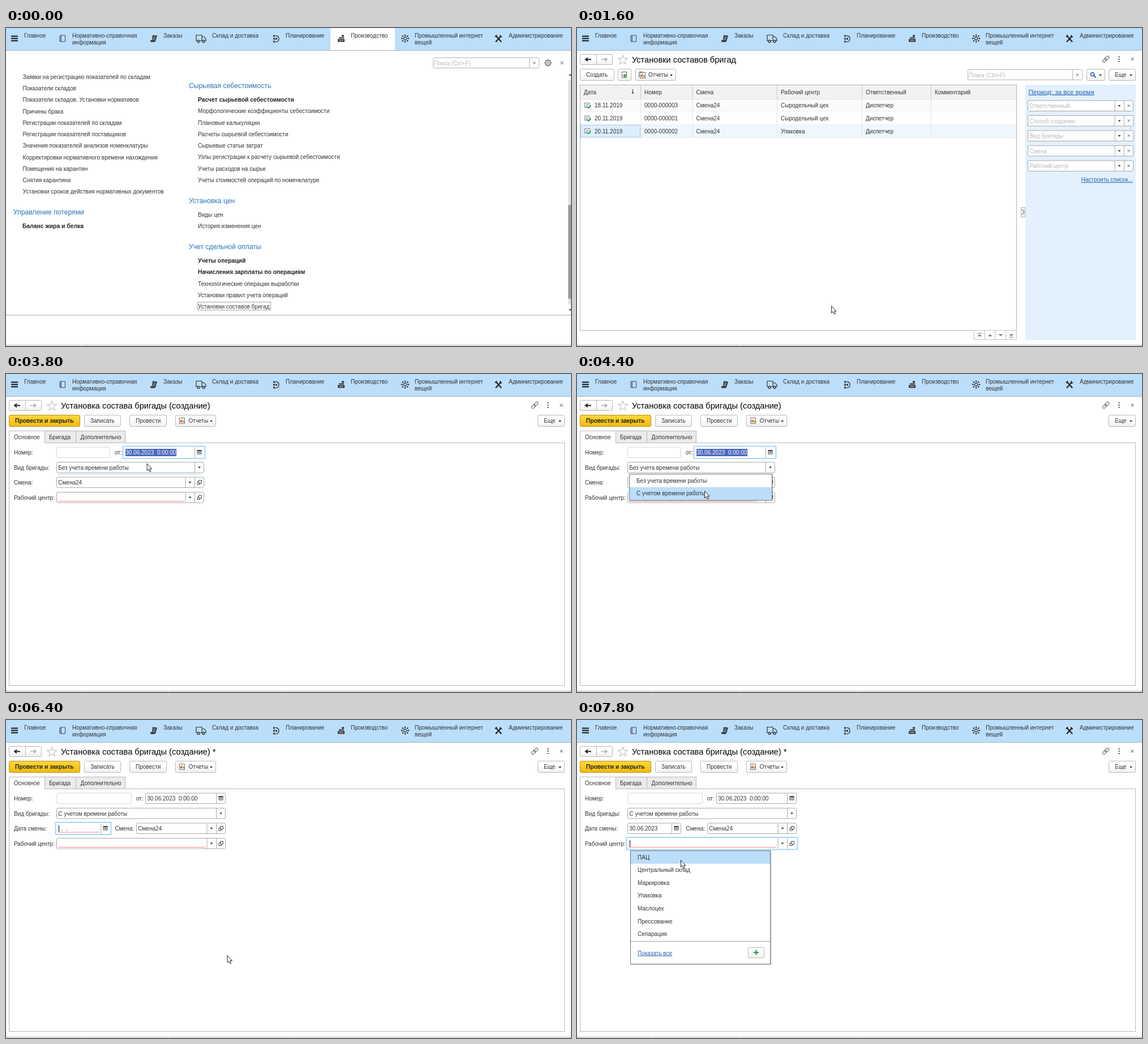
An HTML page that plays this animation: 998 px wide and 561 px high, repeating every 8 s.

```html
<!DOCTYPE html>
<html lang="ru">
<head>
<meta charset="utf-8">
<style>
html, body { margin: 0; width: 100%; height: 100%; overflow: hidden; background: #fff; }
svg { display: block; width: 998px; height: 561px; }
text { font: 10.03px "Liberation Sans", Arial, sans-serif; fill: #333; white-space: pre; }
.b { font-weight: bold; font-size: 10.35px; fill: #222; }
.h { font-size: 12.2px; fill: #2a73b8; }
.t { font-size: 14.6px; fill: #000; }
.p { fill: #b9b9b9; }
.w { fill: #fff; }
.a { fill: #2467ae; text-decoration: underline; }
.big { font-size: 11.5px; }
</style>
</head>
<body>
<svg id="stage" viewBox="0 0 998 561"></svg>
<script>
const LOOP = 8000, STEP = 200;
const stage = document.getElementById('stage');

// Basic shapes; text is placed by the middle of its capitals.
const text = (x, y, s, cls = '') => {
  const drop = cls == 't' ? 5.2 : cls == 'h' ? 4.2 : 3.6;
  return `<text x="${x}" y="${y + drop}" class="${cls}">${s}</text>`;
};
const rect = (x, y, w, h, fill = '#fff', stroke = 'none', r = 0, sw = 1) =>
  `<rect x="${x}" y="${y}" width="${w}" height="${h}" rx="${r}" fill="${fill}" stroke="${stroke}" stroke-width="${sw}"/>`;
const path = (d, stroke = '#333', fill = 'none', sw = 1) =>
  `<path d="${d}" stroke="${stroke}" fill="${fill}" stroke-width="${sw}"/>`;
const at = (x, y, s) => `<g transform="translate(${x} ${y})">${s}</g>`;
const solid = (d, c = '#333') => path(d, 'none', c);
const caretDown = (x, y) => solid(`M${x - 2.5} ${y - 1}h5l-2.5 3z`);
const cross = (x, y, r = 2, c = '#555') => path(`M${x - r} ${y - r}l${2 * r} ${2 * r}m0 ${-2 * r}l${-2 * r} ${2 * r}`, c);

const defs = `<defs>
<linearGradient id="grey" x2="0" y2="1"><stop offset=".4" stop-color="#fff"/><stop offset="1" stop-color="#f0f0f0"/></linearGradient>
<linearGradient id="gold" x2="0" y2="1"><stop stop-color="#ffd83a"/><stop offset="1" stop-color="#f2b90c"/></linearGradient></defs>`;

const icons = {
  book: path('M-3.5-5.5h9v11h-9zM-1.5-5.5v11M-5-3h2M-5 0h2M-5 3h2', '#445'),
  orders: solid('M-2-6L6-5 3 5Q2 7-6 6L-6 3-3 3z') + path('M-.5-3l4 .5M-1.2-.5l4 .5M-2 2l4 .5', '#bbdefb'),
  truck: path('M-8-6H2V4H-8zM2-3H6L9 1V4H2', '#333', 'none', 1.2) +
    '<g fill="#bbdefb" stroke="#333" stroke-width="1.3"><circle cx="-4" cy="5" r="2"/><circle cx="5" cy="5" r="2"/></g>',
  plan: solid('M-4-6h3v3h-3zM-4-1h3v3h-3zM-4 4h3v3h-3zM0-1h3v3h-3z') + path('M0-5Q6-5 6 .5T0 6', '#333', 'none', 1.3),
  factory: solid('M-6 1H6V6H-6zM-4-2H5V0H-4zM1-6H5V-3H1z') + path('M-4 3.5H4', '#ddd'),
  net: path('M0-6V6M-6 0H6M-5-5L5 5M5-5L-5 5') +
    [...Array(8)].map((_, i) => `<circle cx="${(6 * Math.cos(i * Math.PI / 4)).toFixed(1)}" cy="${(6 * Math.sin(i * Math.PI / 4)).toFixed(1)}" r="1.2" fill="#333"/>`).join('') +
    '<circle r="2.3" fill="#bbdefb" stroke="#333"/>',
  tools: path('M-4-4L5 6M4-4L-5 6', '#222', 'none', 2.3) + path('M-6-3l3-3M3-6l0 3 3 0', '#222', 'none', 2),
};
const sections = [
  [32, 0, '', 'Главное'], [117, 99, 'book', 'Нормативно-справочная', 'информация'],
  [278, 261, 'orders', 'Заказы'], [364, 344, 'truck', 'Склад и доставка'],
  [494, 476, 'plan', 'Планирование'], [609, 592, 'factory', 'Производство'],
  [722, 705, 'net', 'Промышленный интернет', 'вещей'], [888, 870, 'tools', 'Администрирование'],
];

function header(active) {
  return rect(0, 0, 998, 39, '#bbdefb') + path('M0 39.5H998', '#9db4c8') +
    (active ? rect(573, 0, 114, 39) : '') +
    path('M9 14.5H21M9 18.5H21M9 22.5H21', '#111', 'none', 2) +
    sections.map(([x, ix, icon, a, b]) =>
      (icon ? at(ix, 18.5, icons[icon]) : '') + text(x, 13, a) + (b ? text(x, 25.5, b) : '')).join('');
}

function statusBar(...ticks) {
  return path('M0 559.5H998', '#a9a9a9') + ticks.map(x => rect(x, 559, 2, 2, '#e8e8e8')).join('');
}

function button(x, y, w, label, { lx = x + 10, cls = '', fill = 'url(#grey)', edge = '#b8b8b8', drop = false } = {}) {
  return rect(x + .5, y + .5, w, 20, fill, edge, 2) + text(lx, y + 10.8, label, cls) +
    (drop ? caretDown(x + w - 7.5, y + 11) : '');
}

const reportIcon = (x, y) => rect(x + .5, y - 5, 9, 10, '#fff', '#777') +
  rect(x + 2, y - 1, 2, 4, '#d33') + rect(x + 4.3, y - 3, 2, 6, '#e8a32a') + rect(x + 6.6, y, 2, 3, '#3a9a4a');

function search(x, y, w) {
  return rect(x + .5, y + .5, w, 18, '#fff', '#b5b5b5', 2) + path(`M${x + w - 16.5} ${y + 1}v18`, '#b5b5b5') +
    text(x + 2, y + 10, 'Поиск (Ctrl+F)', 'p') + cross(x + w - 8, y + 9.5);
}

function titleBar(title) {
  const star = [...Array(10)].map((_, i) => {
    const r = i % 2 ? 3.7 : 9, a = (i / 5 - .5) * Math.PI;
    return `${(r * Math.cos(a)).toFixed(1)},${(r * Math.sin(a)).toFixed(1)}`;
  }).join(' ');
  return rect(5.5, 46.5, 57, 18, 'url(#grey)', '#b8b8b8', 2) + path('M34.5 47V64', '#b8b8b8') +
    path('M25 55.5H15m4-3l-4 3 4 3', '#222', 'none', 1.8) + path('M43 55.5H53m-4-3l4 3-4 3', '#aaa', 'none', 1.5) +
    at(81, 56.5, `<polygon points="${star}" fill="none" stroke="#b4b4b4"/>`) +
    text(97, 55.8, title, 't') +
    at(934, 55, `<g transform="rotate(-45)" fill="none" stroke="#666"><rect x="-7" y="-2.3" width="8" height="4.6" rx="2.3"/><rect x="-1" y="-2.3" width="8" height="4.6" rx="2.3"/></g>`) +
    [51, 55, 59].map(y => rect(956.5, y - 1, 2, 2, '#444')).join('') + cross(981, 55, 2.5);
}

const leftItems = ['Заявки на регистрацию показателей по складам', 'Показатели складов',
  'Показатели складов. Установки нормативов', 'Причины брака', 'Регистрации показателей по складам',
  'Регистрации показателей поставщиков', 'Значения показателей анализов номенклатуры',
  'Корректировки нормативного времени нахождения', 'Помещения на карантин', 'Снятия карантина',
  'Установки сроков действия нормативных документов'];
// Each block: left edge, heading middle, heading, count of bold items, items.
const blocks = [
  [13, 325, 'Управление потерями', 1, ['Баланс жира и белка']],
  [323, 102, 'Сырьевая себестоимость', 1, ['Расчет сырьевой себестоимости', 'Морфологические коэффициенты себестоимости',
    'Плановые калькуляции', 'Расчеты сырьевой себестоимости', 'Сырьевые статьи затрат',
    'Узлы регистрации к расчету сырьевой себестоимости', 'Учеты расходов на сырье', 'Учеты стоимостей операций по номенклатуре']],
  [323, 305, 'Установка цен', 0, ['Виды цен', 'История изменения цен']],
  [323, 386, 'Учет сдельной оплаты', 2, ['Учеты операций', 'Начисления зарплаты по операциям',
    'Технологические операции выработки', 'Установки правил учета операций', 'Установки составов бригад']],
];

function menuScene() {
  const teeth = [...Array(8)].map((_, i) => `<path d="M0-4.2V-6.2" transform="rotate(${i * 45})" stroke="#555" stroke-width="2"/>`).join('');
  return header(true) + search(754, 52, 187) +
    at(957.5, 61.5, teeth + '<circle r="4.3" fill="#fff" stroke="#555"/><circle r="1.8" fill="none" stroke="#555"/>') +
    cross(982, 61.5, 2.7) +
    leftItems.map((s, i) => text(29.5, 86.3 + i * 20.25, s)).join('') +
    blocks.map(([x, y, head, bold, items]) => text(x, y, head, 'h') +
      items.map((s, i) => text(x + 16, y + 24.5 + i * 20.25, s, i < bold ? 'b' : '')).join('')).join('') +
    `<rect x="338.5" y="483.5" width="129" height="14" fill="none" stroke="#444" stroke-dasharray="1 1"/>` +
    rect(993, 91, 5, 397, '#e2e2e2', 'none', 2) + rect(993, 312, 5, 166, '#9a9a9a', 'none', 2) +
    solid('M994 84l2.5-3 2.5 3zM994 496h5l-2.5 3z', '#444') +
    path('M0 506.5H998', '#a9a9a9') + statusBar(132);
}

const columns = [[12, 'Дата'], [119, 'Номер'], [210.5, 'Смена'], [360, 'Рабочий центр'], [510, 'Ответственный'], [632, 'Комментарий']];
const records = [['18.11.2019', 3, 'Сыродельный цех'], ['20.11.2019', 1, 'Сыродельный цех'], ['20.11.2019', 2, 'Упаковка']];
const filters = ['Ответственный', 'Способ создания', 'Вид бригады', 'Смена', 'Рабочий центр'];

function listScene() {
  const dividers = columns.slice(1).map(([x]) => x - 6.5);
  const rows = records.map(([date, n, place], i) => {
    const y = 125.5 + i * 22.6, mid = y + 11.3;
    return rect(6, y, 770, 22.6, ['#fafafa', '#fff', '#eff7fe'][i]) + path(`M6 ${y + 22.6}H776`, '#e5e5e5') +
      (i == 2 ? rect(6.5, y + .5, 105, 21, '#dceefd', '#a8cdee') : '') +
      rect(13.5, mid - 4.5, 9, 8, '#fff', '#889') + path(`M15 ${mid - 2}h6M15 ${mid}h6M15 ${mid + 2}h3`, '#99a') +
      path(`M18 ${mid + 2}l2.5 2.5 4-4.5`, '#19a03a', 'none', 1.7) +
      [date, '0000-00000' + n, 'Смена24', place, 'Диспетчер'].map((s, k) => text(k ? columns[k][0] : 31, mid, s)).join('');
  }).join('');
  return header() + titleBar('Установки составов бригад') +
    button(5, 72, 60, 'Создать', { lx: 16 }) + button(72, 72, 23, '') +
    rect(79.5, 77.5, 8, 10, '#fff', '#666') + path('M81.5 84h6m-3-3v6', '#1a9a38', 'none', 1.8) +
    button(103, 72, 71, 'Отчеты', { lx: 126, drop: true }) + path('M109.5 87V77.5H117', '#777') + reportIcon(111, 83.5) +
    search(690, 73, 202) + button(900, 72, 32, '', { drop: true }) +
    '<circle cx="910.5" cy="81.5" r="3" fill="none" stroke="#2a62a8" stroke-width="1.6"/>' + path('M913 84l3.5 3.5', '#2a62a8', 'none', 2) +
    button(939, 72, 47, 'Еще', { lx: 950, drop: true }) +
    rect(5.5, 100.5, 771, 433, '#fff', '#b3b3b3') + rect(6, 101, 770, 24, '#f2f2f2') + path('M6 125.5H776', '#d0d0d0') +
    rows + dividers.map(x => path(`M${x} 101V125`, '#c8c8c8') + path(`M${x} 126V193`, '#e5e5e5')).join('') +
    columns.map(([x, s]) => text(x, 113, s)).join('') + path('M98.5 108v8m-2-2.5l2 2.5 2-2.5') +
    [0, 1, 2, 3].map(i => rect(701.5 + i * 18.7, 533.5, 18.7, 16, '#fff', '#c4c4c4') +
      at(711 + i * 18.7, 542, solid(i < 2 ? 'M-4 2L0-2 4 2z' : 'M-4-2H4L0 2z', '#888') +
        (i % 3 ? '' : path(i ? 'M-4 3.5H4' : 'M-4-3.5H4', '#888')))).join('') +
    rect(792, 100, 195, 450, '#e3f0fd') + rect(784.5, 316.5, 7, 17, '#f0f0f0', '#b8b8b8') + path('M786 320l4 5-4 5', '#555') +
    text(797.5, 113, 'Период: за все время', 'a big') +
    filters.map((s, i) => field(796, 127.5 + i * 26.5, 187, s, { cls: 'p', cells: 'dx' })).join('') +
    text(890.5, 267.5, 'Настроить список...', 'a') + statusBar(133, 286);
}

// Input box; cells lists the small buttons at its right: drop, open, calendar, clear.
function field(x, y, w, value = '', { cls = '', cells = '', focus = false, need = false, selected = 0, dim = false, caret = false } = {}) {
  const mid = y + 10, cellW = 16.5;
  let s = rect(x + .5, y + .5, w - 1, 18.5, '#fff', dim ? '#d6d6d6' : '#a9a9a9', 2);
  if (focus) s = rect(x - 1.5, y - 1, w + 3, 21.5, '#fff', '#a9d5f7', 1, 2);
  [...cells].forEach((c, i) => {
    const left = x + w - (cells.length - i) * cellW, m = left + 8;
    s += path(`M${left} ${y + 1}v18`, '#a9a9a9');
    if (c == 'd') s += caretDown(m, mid - .5);
    if (c == 'x') s += cross(m, mid - .5);
    if (c == 'o') s += path(`M${m - 1} ${mid - 4}h5v5h-5zM${m - 1} ${mid - 1}h-2.5v4.5h4.5v-2.5`, '#444');
    if (c == 'c') s += rect(m - 3.5, mid - 4, 7, 6.5, '#fff', '#444') + rect(m - 3.5, mid - 4, 7, 2, '#444') + path(`M${m - 2} ${mid}h4`, '#444', 'none', 1.5);
  });
  if (need) s += path(`M${x + 3} ${y + 16.5}H${x + w - cells.length * cellW - 3}`, '#f38a8a');
  if (selected) s += rect(x + 3, y + 3.5, selected, 13, '#4c69bd');
  if (caret) s += path(`M${x + 4.5} ${y + 4}v12`, '#000');
  return s + text(x + 3.2, mid, value, selected ? 'w' : cls);
}

function popup(x, y, w, items, active, footer) {
  const rowH = 22.6, h = items.length * rowH + (footer ? 42 : 1);
  return rect(x + 2, y + 2, w, h, '#00000022') + rect(x + .5, y + .5, w - 1, h, '#fff', '#707070') +
    (active < 0 ? '' : rect(x + 1, y + 1 + active * rowH, w - 2, rowH, '#bbdefb')) +
    items.map((s, i) => text(x + 13, y + 12 + i * rowH, s)).join('') +
    (footer ? path(`M${x + 1} ${y + 160.5}h${w - 2}`, '#a0a0a0') + text(x + 13, y + 181, 'Показать все', 'a') +
      rect(x + 208.5, y + 171.5, 28, 18, 'url(#grey)', '#b8b8b8', 2) + path(`M${x + 218} ${y + 180}h9m-4.5-4.5v9`, '#14a03c', 'none', 2.2) : '');
}

const places = ['ПАЦ', 'Центральный склад', 'Маркировка', 'Упаковка', 'Маслоцех', 'Прессование', 'Сепарация'];
const kinds = ['Без учета времени работы', 'С учетом времени работы'];

function formScene(t) {
  const timed = t >= 4600, dateFocus = t >= 5600 && t < 7000, dated = t >= 7000;
  let s = header() + titleBar('Установка состава бригады (создание)' + (timed ? ' *' : '')) +
    button(5, 72, 125, 'Провести и закрыть', { lx: 16, cls: 'b', fill: 'url(#gold)', edge: '#b39020' }) +
    button(138, 72, 64, 'Записать', { lx: 149 }) + button(218, 72, 65, 'Провести', { lx: 229 }) +
    button(299, 72, 71, 'Отчеты', { lx: 322.5, drop: true }) + reportIcon(306, 82.5) +
    button(939, 72, 47, 'Еще', { lx: 950, drop: true }) +
    rect(5.5, 121.5, 981, 428, '#fff', '#b8b8b8') +
    rect(68.5, 100.5, 55, 21, '#ebebeb', '#b8b8b8') + rect(123.5, 100.5, 87, 21, '#ebebeb', '#b8b8b8') +
    path('M5.5 123V100.5H68.5V121.5', '#b8b8b8', '#fff') + rect(6, 120, 62, 3) +
    text(14, 111.5, 'Основное') + text(76, 111.5, 'Бригада') + text(131.5, 111.5, 'Дополнительно') +
    text(14, 138.5, 'Номер:') + text(14, 165, 'Вид бригады:') + text(14, 218, 'Рабочий центр:');
  const when = '30.06.2023  0:00:00';
  if (!timed) {
    s += field(89, 128.5, 95, '', { dim: true }) + text(192, 138.5, 'от:') +
      field(208, 128.5, 142, when, { cells: 'c', focus: true, selected: 90 }) +
      field(89, 155, 261, kinds[0], { cells: 'd' }) +
      text(14, 191.5, 'Смена:') + field(89, 181.5, 261, 'Смена24', { cells: 'do' }) +
      field(89, 208, 261, '', { cells: 'do', need: true });
    if (t == 3800) s += path('M92 176.5H344', '#a3d0f0');
    if (t >= 4000) s += popup(92, 176, 253, kinds, t < 4400 ? 0 : 1);
    return s + statusBar(133, 286, 494);
  }
  s += field(89, 128.5, 133, '', { dim: true }) + text(230, 138.5, 'от:') + field(246, 128.5, 142, when, { cells: 'c' }) +
    field(89, 155, 299, kinds[1], { cells: 'd', focus: t < 5600, selected: t < 5600 ? 122 : 0 }) +
    text(14, 191.5, 'Дата смены:') +
    field(89, 181.5, 95, dated ? '30.06.2023' : '  .  .', { cells: 'c', need: !dated, focus: dateFocus, caret: dateFocus }) +
    text(192.5, 191.5, 'Смена:') + field(230, 181.5, 158, 'Смена24', { cells: 'do' }) +
    field(89, 208, 299, '', { cells: 'do', need: true, focus: dated, caret: dated });
  if (t >= 7200) s += popup(94, 230, 248, places, t == 7600 ? 1 : 0, true);
  return s + statusBar(133, 286, 502);
}

// Pointer track: time, x, y.
const track = [[400, 325, 229], [800, 543, 360], [1200, 449, 490], [1600, 449, 490], [2200, 30, 82], [2400, 15.5, 80],
  [2600, 19, 77], [3000, 130, 203], [3400, 230, 190], [3800, 248.5, 157.5], [4400, 225, 206], [4800, 236, 198],
  [5200, 236, 198], [5600, 120, 190], [5800, 120, 190], [6200, 543, 490], [6400, 390.5, 415], [6800, 176, 190],
  [7200, 176, 220], [7400, 160, 238], [7600, 190, 258], [7800, 183, 247]];

function pointer(t) {
  if (t < track[0][0]) return '';
  const i = track.findLastIndex(k => k[0] <= t);
  const [t0, x0, y0] = track[i], [t1, x1, y1] = track[i + 1] || [t0 + 1, x0, y0];
  const p = (t - t0) / (t1 - t0), x = x0 + (x1 - x0) * p, y = y0 + (y1 - y0) * p;
  const beam = t >= 4800 && t <= 5800;
  return at(x, y, beam
    ? path('M-2.5-5H-.5L.5-4 1.5-5H3.5M.5-4V5M-2.5 6H-.5L.5 5 1.5 6H3.5', '#222')
    : path('M.5.5V12.8L3.2 10.4 5.4 14.8 7.3 13.8 5.3 9.6H9z', '#222', '#fff'));
}

function scene(t) {
  const page = t < 1600 ? menuScene() : t < 2400 ? listScene() : formScene(t);
  return defs + page + pointer(t);
}

let shown = -1;
const start = performance.now();
function tick() {
  const t = Math.floor((performance.now() - start) % LOOP / STEP) * STEP;
  if (t !== shown) stage.innerHTML = scene(shown = t);
  requestAnimationFrame(tick);
}
tick();
</script>
</body>
</html>
```
